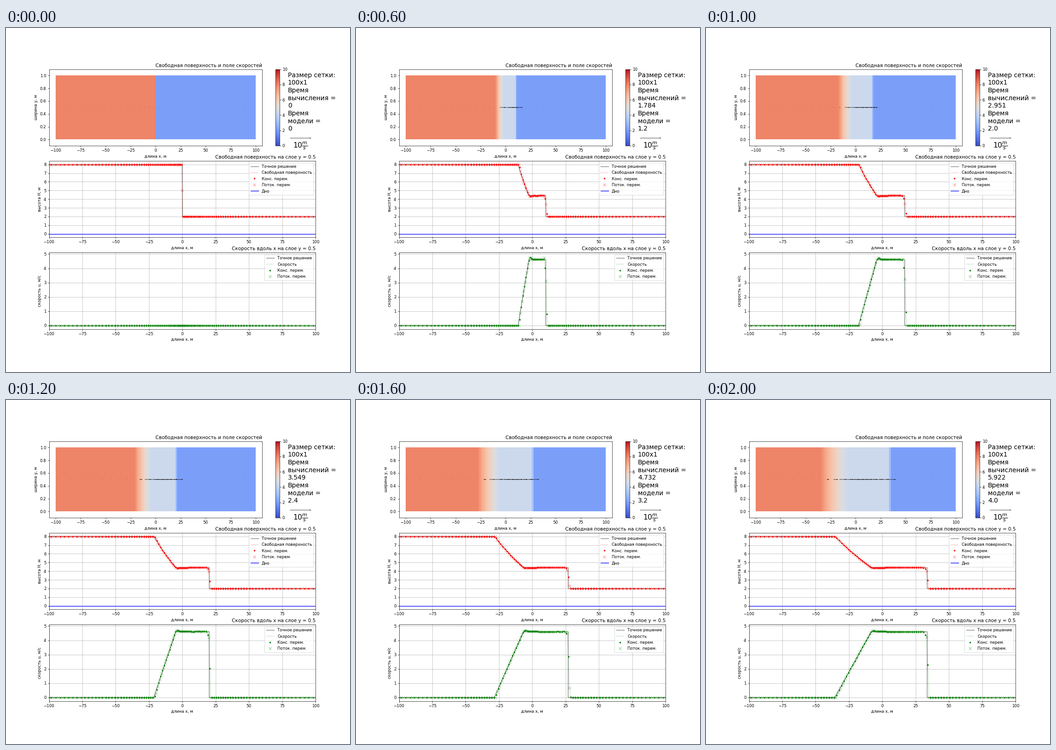
These frames come from a looping animation (748 by 748 pixels, 2.2 s). A matplotlib script:

```python
import numpy as np
import matplotlib.pyplot as plt
from matplotlib.animation import FuncAnimation

plt.rcParams.update({"font.family": "DejaVu Sans", "font.size": 10})

G = 10.0
H_LEFT, H_RIGHT = 8.0, 2.0
FRAMES, STEP, SUBSTEPS = 11, 0.4, 10
CPU_TIME = [0, 0.612, 1.201, 1.784, 2.362, 2.951, 3.549, 4.138, 4.732, 5.307, 5.922]

# Grid of 100 cells, each 2.5% wider than its neighbour nearer the dam
half = 100 * (1.025 ** np.arange(51) - 1) / (1.025 ** 50 - 1)
faces = np.concatenate([-half[:0:-1], half])
dx = np.diff(faces)
cells = (faces[:-1] + faces[1:]) / 2


def fluxes(h, u):
    return h * u, h * u ** 2 + G * h ** 2 / 2


def half_step(h, u, hf, uf, dt):
    mass, mom = fluxes(hf, uf)
    h_new = h - dt / 2 * np.diff(mass) / dx
    hu_new = h * u - dt / 2 * np.diff(mom) / dx
    return h_new, hu_new / h_new


def extrapolate(inv, near, far):
    """Carry an invariant across the cell, limited by its local range."""
    low = np.minimum(np.minimum(near, far), inv)
    high = np.maximum(np.maximum(near, far), inv)
    return np.clip(2 * inv - near, low, high)


def cabaret(h, u, hf, uf, dt):
    hm, um = half_step(h, u, hf, uf, dt)
    k = np.sqrt(G / hm)
    c = k * hm
    r = extrapolate(um + c, uf[:-1] + k * hf[:-1], uf[1:] + k * hf[1:])
    q = extrapolate(um - c, uf[1:] - k * hf[1:], uf[:-1] - k * hf[:-1])
    hf, uf = hf.copy(), uf.copy()
    hf[1:-1] = (r[:-1] - q[1:]) / (k[:-1] + k[1:])
    uf[1:-1] = r[:-1] - k[:-1] * hf[1:-1]
    h, u = half_step(hm, um, hf, uf, dt)
    return h, u, hf, uf


def simulate():
    h = np.where(cells < 0, H_LEFT, H_RIGHT)
    hf = np.where(faces < 0, H_LEFT, H_RIGHT)
    hf[50] = (H_LEFT + H_RIGHT) / 2
    state = h, np.zeros_like(h), hf, np.zeros_like(hf)
    states = [state]
    for _ in range(FRAMES - 1):
        for _ in range(SUBSTEPS):
            state = cabaret(*state, STEP / SUBSTEPS)
        states.append(state)
    return states


def plateau():
    """Depth and speed between the rarefaction and the shock."""
    lo, hi = H_RIGHT, H_LEFT
    for _ in range(60):
        h = (lo + hi) / 2
        u = 2 * (np.sqrt(G * H_LEFT) - np.sqrt(G * h))
        shock = (h - H_RIGHT) * np.sqrt(G / 2 * (h + H_RIGHT) / (h * H_RIGHT))
        lo, hi = (h, hi) if u > shock else (lo, h)
    return h, u


H_MID, U_MID = plateau()


def exact(t):
    if t == 0:
        x = np.array([-100, 0, 0, 100])
        return x, np.array([H_LEFT, H_LEFT, H_RIGHT, H_RIGHT]), np.zeros(4)
    c0 = np.sqrt(G * H_LEFT)
    fan = np.linspace(-c0, U_MID - np.sqrt(G * H_MID), 60)
    shock = H_MID * U_MID / (H_MID - H_RIGHT)
    x = np.concatenate([[-100], fan * t, [shock * t, shock * t, 100]])
    h = np.concatenate([[H_LEFT], (2 * c0 - fan) ** 2 / (9 * G),
                        [H_MID, H_RIGHT, H_RIGHT]])
    u = np.concatenate([[0], 2 / 3 * (c0 + fan), [U_MID, 0, 0]])
    return x, h, u


def merge(at_cells, at_faces):
    out = np.empty(len(faces) + len(cells))
    out[0::2], out[1::2] = at_faces, at_cells
    return out


states = simulate()
all_x = merge(cells, faces)

fig, (top, mid, low) = plt.subplots(3, 1, figsize=(12, 12), dpi=748 / 12)
fig.subplots_adjust(left=0.125, right=0.9, bottom=0.125, top=0.88,
                    hspace=0.2)

# Plan view with velocity arrows
mesh = top.pcolormesh(faces, [0, 1], states[0][0][None, :], vmin=0, vmax=10,
                      cmap="coolwarm")
fig.colorbar(mesh, ax=top)
picked = slice(0, None, 4)
zeros = np.zeros(25)
arrows = top.quiver(cells[picked], zeros + 0.5, zeros, zeros, units="width",
                    scale=100, width=0.0015)
top.quiverkey(arrows, 1.18, 0.1, 10, r"$10\frac{m}{s}$", labelpos="S",
              coordinates="axes", fontproperties={"size": 18})
top.set(xlim=(-106.5, 106.5), ylim=(-0.0975, 1.0975),
        xlabel="длина x, м", ylabel="ширина y, м")
top.set_title("Свободная поверхность и поле скоростей", loc="right")


def note(y, text=""):
    return top.text(1.12, y, text, transform=top.transAxes, fontsize=16)


note(0.8, "Размер сетки:\n100x1")
cpu_note = note(0.5)
model_note = note(0.2)


def profile(ax, color, name, title, ylabel, ylim):
    ax.set(xlim=(-100, 100), ylim=ylim, xlabel="длина x, м", ylabel=ylabel)
    ax.set_title(title, loc="right")
    ax.grid()
    return [
        ax.plot([], [], "k-", alpha=0.5, label="Точное решение")[0],
        ax.plot([], [], color + ":", alpha=0.5, label=name)[0],
        ax.plot([], [], color + ".", label="Конс. перем.")[0],
        ax.plot([], [], color + "x", alpha=0.5, label="Поток. перем.")[0],
    ]


depth = profile(mid, "r", "Свободная поверхность",
                "Свободная поверхность на слое y = 0.5", "высота H, м",
                (-0.4, 8.4))
mid.plot([-100, 100], [0, 0], "b-", label="Дно")
speed = profile(low, "g", "Скорость", "Скорость вдоль x на слое y = 0.5",
                "скорость u, м/с", (-0.243, 5.098))
mid.legend(loc="upper right")
low.legend(loc="upper right")


def set_profile(lines, x, y, at_cells, at_faces):
    lines[0].set_data(x, y)
    lines[1].set_data(all_x, merge(at_cells, at_faces))
    lines[2].set_data(cells, at_cells)
    lines[3].set_data(faces, at_faces)


def update(i):
    h, u, hf, uf = states[i]
    x, h_exact, u_exact = exact(i * STEP)
    set_profile(depth, x, h_exact, h, hf)
    set_profile(speed, x, u_exact, u, uf)
    mesh.set_array(h[None, :])
    arrows.set_UVC(u[picked], zeros)
    if i == 0:
        cpu_note.set_text("Время\nвычисления =\n0")
        model_note.set_text("Время\nмодели =\n0")
    else:
        cpu_note.set_text(f"Время\nвычислений =\n{CPU_TIME[i]:.3f}")
        model_note.set_text(f"Время\nмодели =\n{i * STEP:.1f}")
    return [mesh, arrows, cpu_note, model_note, *depth, *speed]


anim = FuncAnimation(fig, update, frames=FRAMES, init_func=lambda: update(0),
                     interval=200, repeat=True, repeat_delay=0, blit=False)
plt.show()
```
